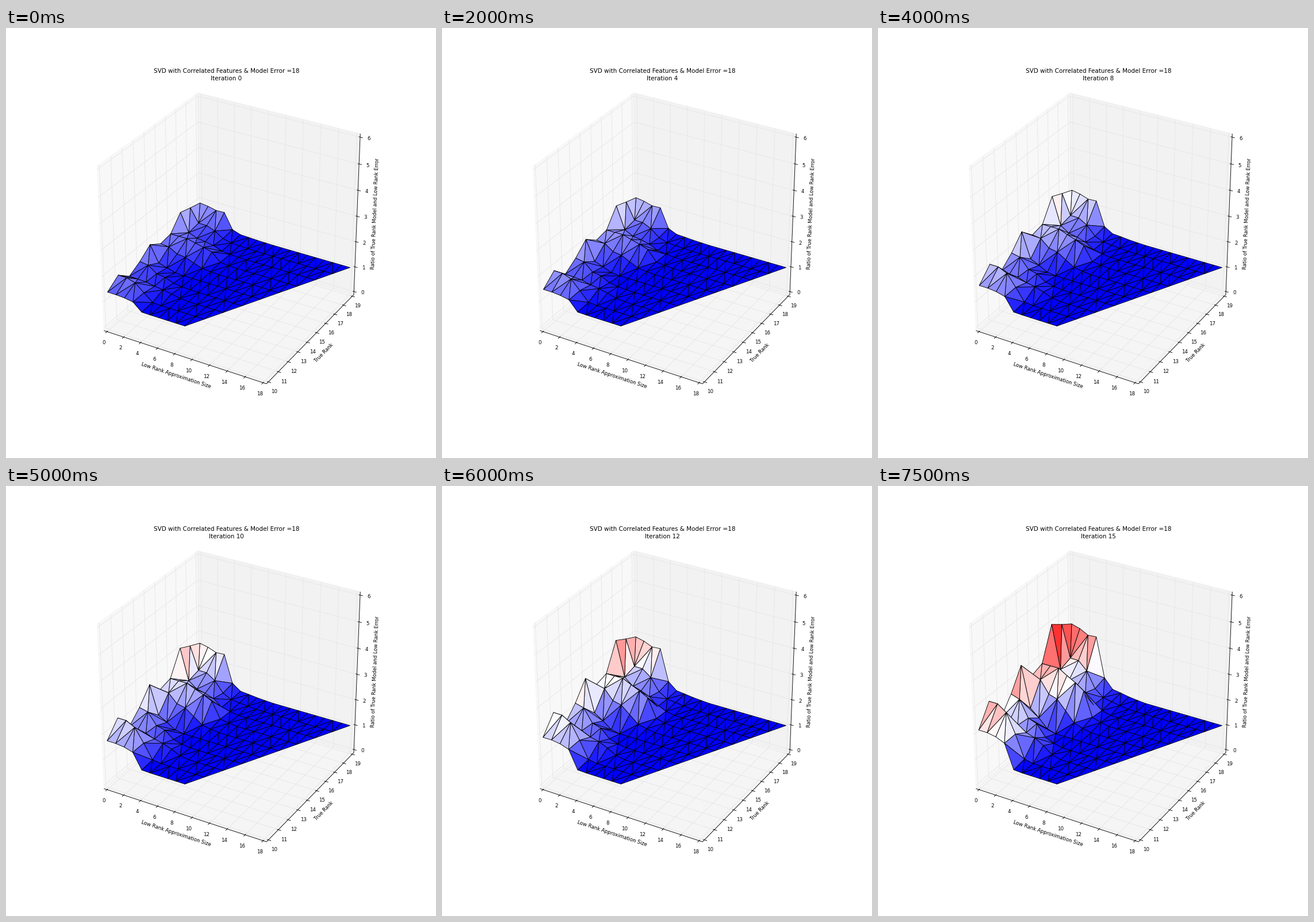
Recreate the animation shown at these times as a matplotlib script. Size 748 by 748 pixels, loop 8000 ms.

```python
import numpy as np
import matplotlib as mpl
import matplotlib.pyplot as plt
from matplotlib.animation import FuncAnimation
from matplotlib.collections import LineCollection, PolyCollection
from matplotlib.tri import Triangulation

SIZE = 748
FRAMES, INTERVAL = 16, 500
LOW = np.array([0, 10, 0])
SPAN = np.array([18, 9, 6])
PAD = 0.5 + 1 / 48            # half width of the padded unit cube
TICK_GAP, LABEL_GAP = 0.0358, 0.0777

plt.rcParams["font.family"] = "DejaVu Sans"

# Squared excess error per true rank (10..19), by approximation size.
EXCESS = [
    [.88, .88, .82, .68, .01],
    [1.82, 1.82, 1.5, .68, .04],
    [.65, .62, .58, .42, .34, .2, .05],
    [1.3, 1.17, .52, .42, .12, .04],
    [2.41, .48, .26, .05],
    [1.38, 1.3, .77, .67, .36, .1, .04],
    [1.57, 1.57, 1.58, 1.32, 1.1, .85, .09, .03],
    [3.56, 1.01, .65, .55, .4, .12, .05],
    [2.99, 1.16, 1.15, .8, .27, .1, .06, .03],
    [2.51, 2.35, 2.08, 2.12, .35, .1, .07, .035, .015],
]

# Camera basis for elevation 30, azimuth -60
elev, azim = np.radians(30), np.radians(-60)
TOWARD = np.array([np.cos(azim) * np.cos(elev),
                   np.sin(azim) * np.cos(elev), np.sin(elev)])
RIGHT = np.array([-np.sin(azim), np.cos(azim), 0])
UP = np.cross(TOWARD, RIGHT)
AXES = 0.775 * SIZE
SCALE = AXES / 0.185
CENTER = 0.125 * SIZE + 0.095 * SCALE


def project(d):
    """Unit-cube offsets from the centre -> pixels (y down)."""
    d = np.asarray(d, float)
    k = SCALE / (10 - d @ TOWARD)
    return np.stack([CENTER + k * (d @ RIGHT),
                     SIZE - CENTER - k * (d @ UP)], axis=-1)


fig = plt.figure(figsize=(12, 12), dpi=SIZE / 12, facecolor="white")
ax = fig.add_axes([0, 0, 1, 1])
ax.set(xlim=(0, SIZE), ylim=(SIZE, 0))
ax.axis("off")


def add_lines(lines, color, width, z):
    ax.add_collection(LineCollection(lines, colors=color, linewidths=width,
                                     zorder=z))


def add_pane(axis, side, gray):
    corners = np.full((4, 3), side * PAD)
    others = [i for i in range(3) if i != axis]
    corners[:, others] = np.array([(-1, -1), (-1, 1), (1, 1), (1, -1)]) * PAD
    ax.add_patch(plt.Polygon(project(corners), fc=str(gray), ec=str(gray),
                             alpha=0.5, lw=1, zorder=1))


add_pane(0, -1, 0.95)
add_pane(1, 1, 0.90)
add_pane(2, -1, 0.925)

BACK = np.array([-PAD, PAD, -PAD])


def add_axis(i, edge, tick_dir, values, label):
    """edge: signs of the axis line's place; zero along the axis itself."""
    edge = np.array(edge, float)
    along = np.eye(3)[i]
    ends = project([edge * PAD - along * PAD, edge * PAD + along * PAD])
    add_lines([ends], "black", 1, 3)

    grid, ticks = [], []
    out = np.eye(3)[tick_dir] * edge[tick_dir] / 12
    for v in values:
        t = along * ((v - LOW[i]) / SPAN[i] - 0.5)
        base = edge * PAD + t
        path = np.array([BACK] * 3)
        path[:, i] = t[i]
        path[0, i - 2] *= -1
        path[2, i - 1] *= -1
        grid.append(project(path))
        ticks.append(project([base - 0.1 * out, base + 0.2 * out]))
        x, y = project(base + edge * TICK_GAP)
        ax.text(x, y, str(v), size=10, ha="center", va="top", zorder=4)
    add_lines(grid, "0.9", 1, 2)
    add_lines(ticks, "black", 1, 3)

    dx, dy = ends[1] - ends[0]
    angle = np.degrees(np.arctan2(-dy, dx))
    x, y = project(edge * (PAD + LABEL_GAP))
    ax.text(x, y, label, size=10, ha="center", va="center",
            rotation=angle, rotation_mode="default", zorder=4)


add_axis(0, (0, -1, -1), 1, range(0, 19, 2), "Low Rank Approximation Size")
add_axis(1, (1, 0, -1), 0, range(10, 20), "True Rank")
add_axis(2, (1, 1, 0), 0, range(7),
         "Ratio of True Rank Model and Low Rank Error")

ax.text(0.5125 * SIZE, 78, "SVD with Correlated Features & Model Error =18",
        size=12, ha="center", va="baseline")
counter = ax.text(0.5125 * SIZE, 91, "", size=12, ha="center", va="baseline")

xs, ys, excess = [], [], []
for rank, row in zip(range(10, 20), EXCESS):
    for size in range(rank):
        xs.append(size)
        ys.append(rank)
        excess.append(row[size] if size < len(row) else 0)
xs, ys, excess = map(np.array, (xs, ys, excess))
faces = Triangulation(xs, ys).triangles

surface = PolyCollection([], edgecolors="black", linewidths=1, zorder=5)
ax.add_collection(surface)
cmap = mpl.colormaps["bwr"]
norm = mpl.colors.Normalize(1, 3.55)


def update(n):
    growth = (1 - 0.0338 * n) ** -2
    z = np.sqrt(1 + excess * growth)
    pts = (np.column_stack([xs, ys, z]) - LOW) / SPAN - 0.5
    order = np.argsort((pts @ TOWARD)[faces].mean(axis=1), kind="stable")
    tri = faces[order]
    surface.set_verts(project(pts)[tri])
    surface.set_facecolor(cmap(norm(z[tri].mean(axis=1))))
    counter.set_text(f"Iteration {n}")
    return surface, counter


anim = FuncAnimation(fig, update, frames=FRAMES, interval=INTERVAL,
                     repeat=True, repeat_delay=0)
plt.show()
```
